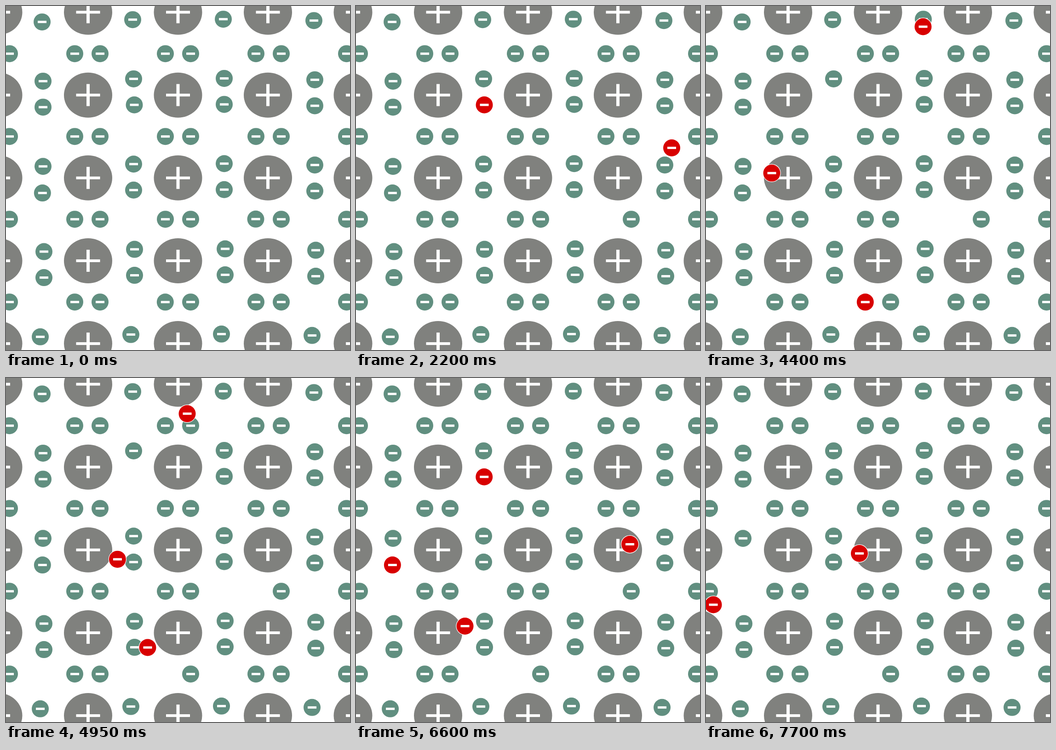
An HTML page with a canvas for the animation above (8000 ms loop, 748x748 px).

```html
<!DOCTYPE html>
<html lang="en">
<head>
<meta charset="utf-8">
<title>Electrons moving through a metal lattice</title>
<style>
  html, body { margin: 0; width: 100%; height: 100%; overflow: hidden; background: #fff; }
  canvas { display: block; width: 100vw; height: 100vh; }
</style>
</head>
<body>
<canvas id="stage" width="748" height="748"></canvas>
<script>
const SIZE = 748, LOOP = 8000, STEP = 550, PITCH = 197;
const GREY = '#80817e', GREEN = '#618f80', RED = '#d80000', WHITE = '#fff';
const ctx = document.getElementById('stage').getContext('2d');

// Key points [step, x, y]; a smooth curve gives the steps between.
const routes = [
  [[1, 543, 463.3], [2, 517.5, 444.5], [3, 567.5, 359.5], [4, 686.5, 308.5], [5, 730, 211.5],
   [6, 653.5, 132.5], [8, 472, 45], [10, 332, 131.5], [12, 278.7, 215]],
  [[4, 279, 215], [6, 155.5, 258.5], [7, 165, 352.5], [8, 143, 363.3],
   [10, 365, 414.5], [12, 595.5, 361.5], [13, 543, 463.3]],
  [[8, 346.3, 643.8], [9, 308, 586], [10, 267.5, 584.5], [11, 237, 539.5],
   [12, 237, 539.5], [14, 333.5, 381.5]],
  [[12, 79.3, 406.6], [13, 22.5, 375.5], [14, 16, 493]]
];

function ellipse(x, y, rx, ry, color) {
  ctx.fillStyle = color;
  ctx.beginPath();
  ctx.ellipse(x, y, rx, ry, 0, 0, Math.PI * 2);
  ctx.fill();
}

function bar(x, y, w, h) {
  ctx.fillStyle = WHITE;
  ctx.fillRect(x - w / 2, y - h / 2, w, h);
}

function nucleus(x, y) {
  ellipse(x, y, 52.5, 49, GREY);
  bar(x, y, 52, 6);
  bar(x, y, 7, 48);
}

function electron([x, y], color) {
  if (color === RED) ellipse(x, y, 19.7, 19.7, WHITE);
  ellipse(x, y, 18.5, 18.5, color);
  bar(x, y, 19, 5);
}

function buildLattice() {
  const spots = [];
  // Side-by-side pairs above and below the nuclei.
  for (let row = 0; row < 4; row++) {
    for (let col = -1; col < 4; col++) {
      for (const side of [-27.5, 27.5]) spots.push([177 + side + col * PITCH, 103.7 + row * 180]);
    }
  }
  // Stacked pairs between the nuclei, each column shifted along a parabola.
  [78.5, 80.5, 80.5, 82.5, 74.5].forEach((x, row) => {
    for (let col = 0; col < 4; col++) {
      const y = 6.4 + row * 185.3 + 2 * col * col - 7 * col;
      for (const side of [-28.25, 28.25]) spots.push([x + col * PITCH, y + side]);
    }
  });
  const isHome = ([x, y]) =>
    routes.some(([[, hx, hy]]) => Math.hypot(hx - x, hy - y) < 5);
  return spots.filter(spot => !isHome(spot));
}

// Cubic Hermite curve through the keys, with slopes taken from the neighbours.
function position(keys, step) {
  const last = keys.length - 1;
  if (step <= keys[0][0]) return keys[0].slice(1);
  if (step >= keys[last][0]) return keys[last].slice(1);
  const i = keys.findIndex(key => key[0] > step) - 1;
  const slope = (k, axis) => {
    const a = keys[Math.max(k - 1, 0)], b = keys[Math.min(k + 1, last)];
    return (b[axis] - a[axis]) / (b[0] - a[0]);
  };
  const from = keys[i], to = keys[i + 1], span = to[0] - from[0];
  const u = (step - from[0]) / span, v = 1 - u;
  return [1, 2].map(axis =>
    from[axis] * v * v * (1 + 2 * u) + to[axis] * u * u * (1 + 2 * v) +
    span * u * v * (slope(i, axis) * v - slope(i + 1, axis) * u));
}

function drawTraveller(keys, step) {
  const moving = step >= keys[0][0] && step <= keys[keys.length - 1][0];
  electron(position(keys, step), moving ? RED : GREEN);
}

const lattice = buildLattice();

function draw(time) {
  const step = Math.floor((time % LOOP) / STEP);
  ctx.fillStyle = WHITE;
  ctx.fillRect(0, 0, SIZE, SIZE);
  for (let row = 0; row < 5; row++) {
    for (let col = -1; col < 4; col++) nucleus(178.5 + col * 195.5, 13.5 + row * 180.15);
  }
  for (const spot of lattice) electron(spot, GREEN);
  for (const keys of routes) drawTraveller(keys, step);
}

const begin = performance.now();
function tick() {
  draw(performance.now() - begin);
  requestAnimationFrame(tick);
}
tick();
</script>
</body>
</html>
```
